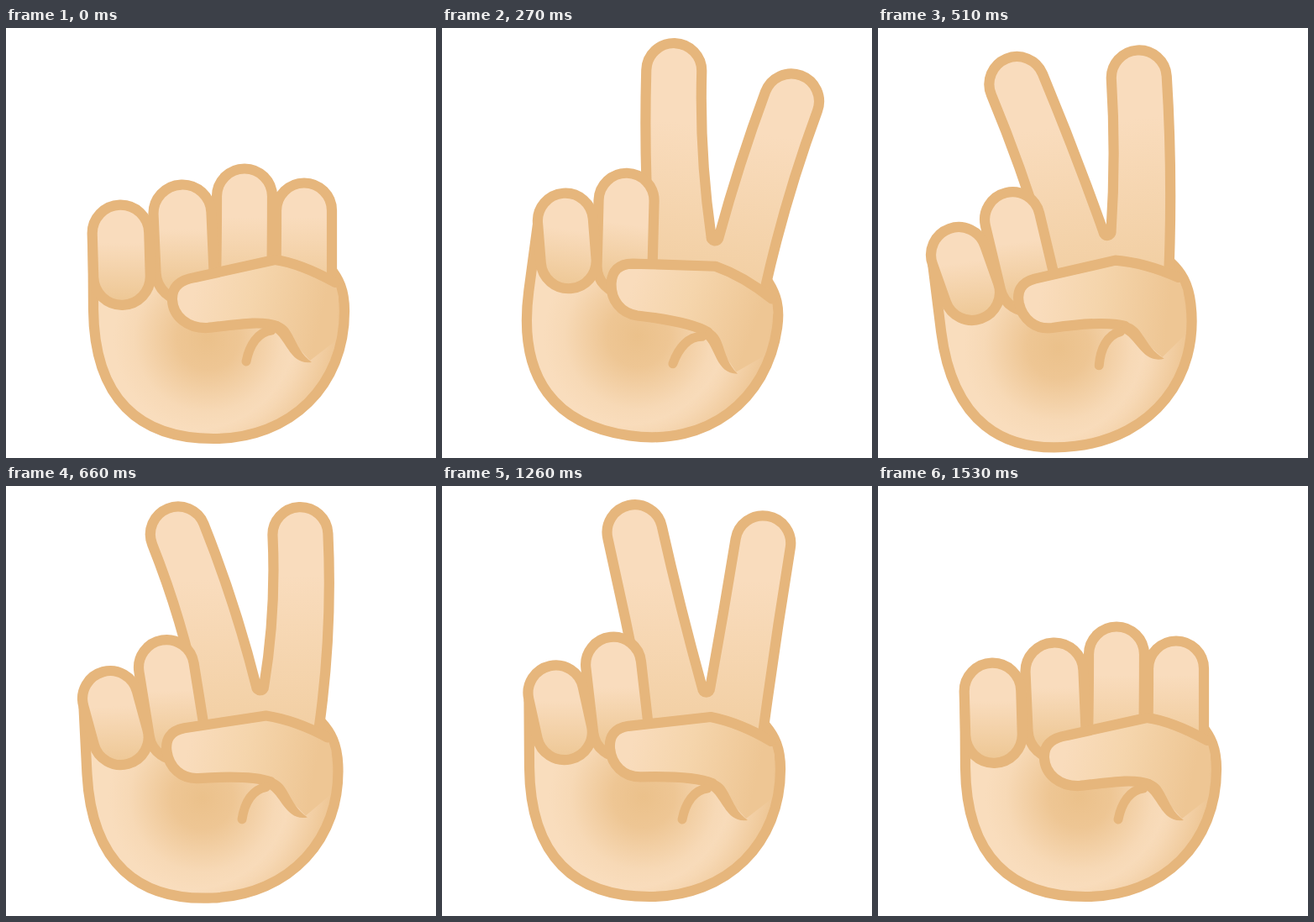
Write an HTML page that moves like this. It is 512 px wide and 512 px high and loops after 1.62 s.

```html
<!DOCTYPE html>
<html lang="en">
<head>
<meta charset="utf-8">
<title>Fist to victory hand</title>
<style>
  html, body { margin: 0; width: 100%; height: 100%; overflow: hidden; background: #fff; }
  svg { display: block; width: 100%; height: 100%; }
  .line { fill: none; }
  #hand { stroke: #e6b67c; stroke-width: 12.2; stroke-linecap: round; stroke-linejoin: round; }
  .plain { stroke: none; }
</style>
</head>
<body>
<svg viewBox="0 0 512 512">
  <defs>
    <radialGradient id="palmShade" gradientUnits="userSpaceOnUse" cx="240" cy="370" r="112">
      <stop offset="0" stop-color="#ebc18b"/>
      <stop offset=".33" stop-color="#eec694"/>
      <stop offset=".78" stop-color="#f7d9b6"/>
      <stop offset="1" stop-color="#f9ddbd"/>
    </radialGradient>
    <radialGradient id="sideShade" gradientUnits="userSpaceOnUse" cx="222" cy="355" r="176">
      <stop offset=".7" stop-color="#edc491" stop-opacity="0"/>
      <stop offset="1" stop-color="#edc491"/>
    </radialGradient>
    <linearGradient id="thumbShade" gradientUnits="userSpaceOnUse" x1="225" y1="310" x2="375" y2="345">
      <stop offset="0" stop-color="#f9dcbc"/>
      <stop offset=".45" stop-color="#f5d5ac"/>
      <stop offset="1" stop-color="#eec694"/>
    </linearGradient>
    <linearGradient id="longShade" gradientUnits="userSpaceOnUse" x1="0" x2="0" y1="225" y2="300">
      <stop offset="0" stop-color="#f9dcbd"/><stop offset="1" stop-color="#f1cd9f"/>
    </linearGradient>
    <linearGradient id="ringShade" gradientUnits="userSpaceOnUse" x1="0" x2="0" y1="240" y2="305">
      <stop offset="0" stop-color="#f9dcbd"/><stop offset="1" stop-color="#eec896"/>
    </linearGradient>
    <linearGradient id="pinkyShade" gradientUnits="userSpaceOnUse" x1="0" x2="0" y1="256" y2="322">
      <stop offset="0" stop-color="#f9dcbd"/><stop offset="1" stop-color="#eec896"/>
    </linearGradient>
  </defs>
  <g id="hand">
    <path class="plain" id="base" fill="url(#palmShade)"/>
    <path id="palm" fill="url(#sideShade)"/>
    <path id="long" fill="url(#longShade)"/>
    <path id="ring" fill="url(#ringShade)"/>
    <path id="pinky" fill="url(#pinkyShade)"/>
    <path class="plain" id="thumb" fill="url(#thumbShade)"/>
    <path class="line" id="thumbLine"/>
    <path class="plain" fill="#e6b67c" d="M320 348.5C345 353 340 380 364 398C338 402 334 370 318 361Z"/>
    <path class="line" stroke-width="11" d="M316 360C300 362 290 377 286 397"/>
  </g>
</svg>
<script>
const LOOP = 1620, STEP = 30;
const $ = id => document.getElementById(id);
const lerp = (a, b, k) => a + (b - a) * k;
const draw = (id, d) => $(id).setAttribute('d', d);

// Keys are [time, value]; cubic interpolation that never overshoots a key.
const tracks = {
  open:  [[0, 0], [140, 0], [180, .08], [240, .94], [300, 1], [1230, 1], [1530, 0], [LOOP, 0]],
  angle: [[0, 0], [180, 13.5], [230, 14], [330, -4], [470, -7], [560, -6], [660, -2.5],
          [780, 1.8], [900, 0], [1260, 0], [1410, -2], [1530, 0], [LOOP, 0]],
  dx:    [[0, 0], [225, 0], [330, -18], [470, -28], [560, -23], [660, -6.5], [780, 0], [LOOP, 0]],
  dy:    [[0, 0], [225, 0], [330, -1], [470, 8], [560, 8], [660, 1], [780, 0], [LOOP, 0]],
  bend:  [[0, 0], [180, 0], [250, 5], [330, 1.8], [560, -6], [660, -8], [780, 2], [900, 0], [LOOP, 0]],
  close: [[0, 5], [660, 5], [800, 0], [LOOP, 0]]
};

function sample(keys, t) {
  const slope = i => keys[i + 1] && keys[i]
    ? (keys[i + 1][1] - keys[i][1]) / (keys[i + 1][0] - keys[i][0]) : 0;
  const tangent = i => {
    const a = slope(i - 1), b = slope(i);
    return a * b > 0 ? 2 * a * b / (a + b) : 0;
  };
  let i = 0;
  while (i < keys.length - 2 && t >= keys[i + 1][0]) i++;
  const [t0, v0] = keys[i], [t1, v1] = keys[i + 1];
  const h = t1 - t0, u = (t - t0) / h, w = 1 - u;
  return v0 * w * w * (1 + 2 * u) + v1 * u * u * (3 - 2 * u)
    + h * u * w * (tangent(i) * w - tangent(i + 1) * u);
}

// Blends two paths that share the same commands.
function mix(a, b, k) {
  const ends = b.match(/-?[\d.]+/g);
  let i = 0;
  return a.replace(/-?[\d.]+/g, n => lerp(+n, +ends[i++], k).toFixed(2));
}

function capsule(ax, ay, bx, by, r) {
  const len = Math.hypot(bx - ax, by - ay);
  const nx = (by - ay) / len * r, ny = -(bx - ax) / len * r;
  return `M${ax - nx} ${ay - ny}A${r} ${r} 0 0 1 ${ax + nx} ${ay + ny}` +
    `L${bx + nx} ${by + ny}A${r} ${r} 0 0 1 ${bx - nx} ${by - ny}Z`;
}

// Outline of a long finger from its left foot over the tip to its right foot.
function finger(left, right, x, y, tilt, bend) {
  const r = 33, s = bend * .3 * Math.PI / 180, px = 315, py = 250;
  const tx = px + (x - px) * Math.cos(s) - (y - py) * Math.sin(s);
  const ty = py + (x - px) * Math.sin(s) + (y - py) * Math.cos(s);
  const a = (tilt + bend) * Math.PI / 180, c = Math.cos(a), n = Math.sin(a);
  const edge = (side, foot) => {
    const ex = tx + side * r * c, ey = ty + side * r * n;
    const half = Math.hypot(foot[0] - ex, foot[1] - ey) / 2;
    return { at: `${ex} ${ey}`, ctrl: `${ex - n * half} ${ey + c * half}` };
  };
  const l = edge(-1, left), e = edge(1, right);
  return `Q${l.ctrl} ${l.at}A${r} ${r} 0 0 1 ${e.at}Q${e.ctrl} ${right}`;
}

const THUMB_FIST = 'M392 303Q350 280 320 276L225 297C205 300 197 310 198 324' +
  'C199 343 216 358 240 357C275 353 305 348 322 355';
const THUMB_OPEN = 'M392 304Q355 282 320 275L222 285.5C205 288 199 298 200 312' +
  'C202 332 216 346 236 346C275 345 305 347 322 354';
const PALM = 'M103.5 256L104 335C105 442 159 489 247 489C340 489 403 425 403 337C403 312 396 298 385 285';

function render(t) {
  const [k, angle, dx, dy, bend, close] =
    ['open', 'angle', 'dx', 'dy', 'bend', 'close'].map(name => sample(tracks[name], t));
  const at = (a, b) => lerp(a, b, k);

  $('hand').setAttribute('transform', `translate(${dx} ${dy}) rotate(${angle} 261 362)`);
  $('longShade').setAttribute('y1', at(225, 110));
  $('longShade').setAttribute('y2', at(295, 320));

  const foot = [at(250, 247), 300], heel = [at(388, 382), 294];
  const forkX = at(319, 314.5), forkY = at(285, 240), gap = at(2.5, 4.5);
  const forkL = [forkX - gap, forkY], forkR = [forkX + gap, forkY];
  const lean = close * .35;
  draw('long', `M${foot}` +
    finger(foot, forkL, at(284, 228 + close), at(200.5, 51), at(0, lean - 13), bend) +
    `A${gap} ${gap} 0 0 0 ${forkR}` +
    finger(forkR, heel, at(355, 383 - close), at(217.5, 64), at(0, 9.5 - lean), bend));
  draw('ring', capsule(at(210, 204), at(221, 212.5), at(213, 213), 290, at(34.5, 33)));
  draw('pinky', capsule(at(136.5, 135.5), at(244.5, 246.5), at(138, 146), at(296, 293), at(33.8, 33)));

  const thumb = mix(THUMB_FIST, THUMB_OPEN, k);
  draw('thumb', thumb + 'L340 372L362 396L393 372L396 320Z');
  draw('thumbLine', thumb);
}

draw('base', PALM);
draw('palm', PALM);

function tick() {
  const t = performance.now() % LOOP;
  render(Math.floor(t / STEP) * STEP);
  requestAnimationFrame(tick);
}
tick();
</script>
</body>
</html>
```
